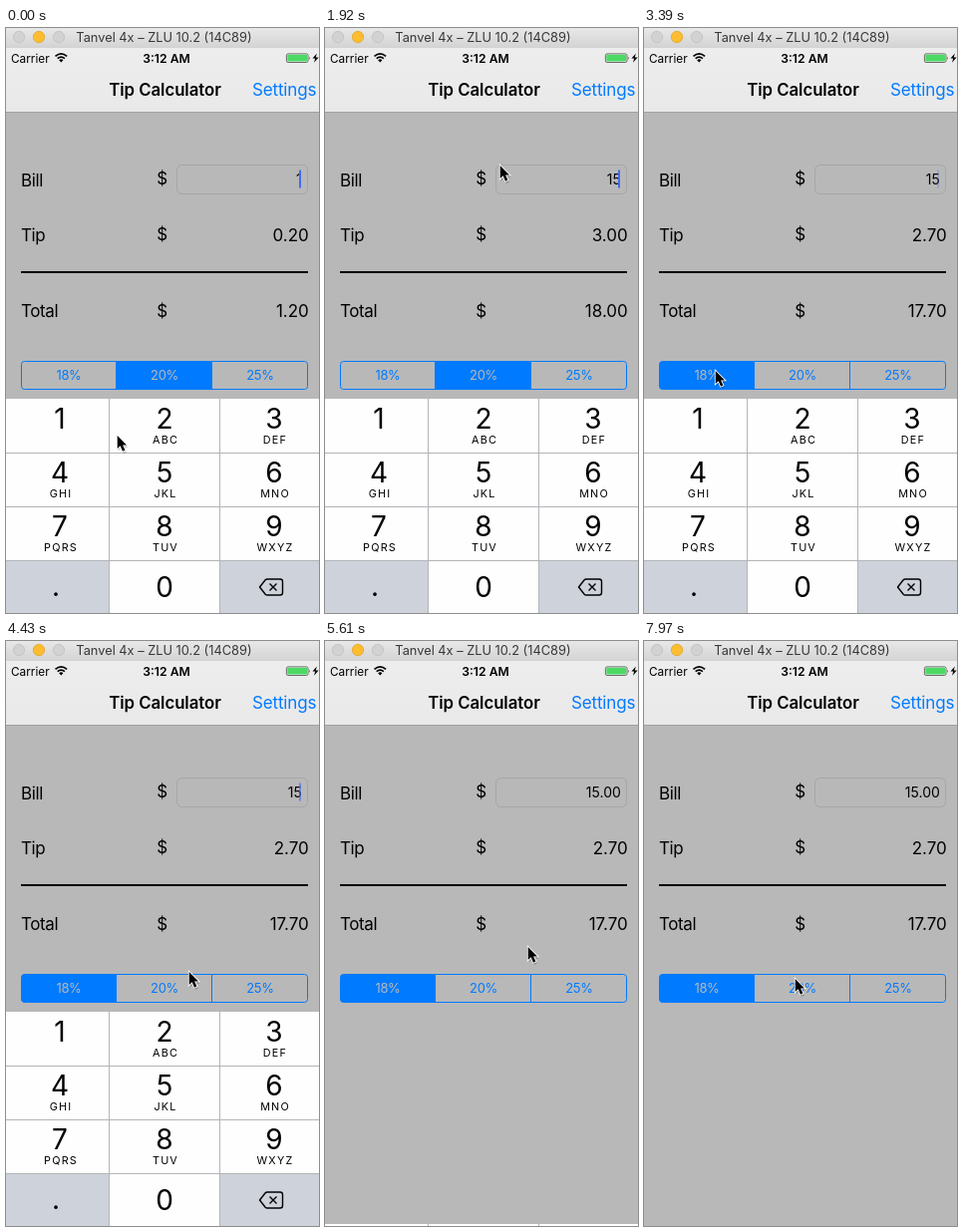
Recreate the animation shown at these times as an HTML page. Size 314 by 587 pixels, loop 8000 ms.

```html
<!DOCTYPE html>
<html lang="en">
<head>
<meta charset="utf-8">
<title>Tip Calculator</title>
<style>
html, body { margin: 0; width: 100%; height: 100%; overflow: hidden; background: #b8b8b8; }
svg { display: block; width: 314px; height: 587px; font: 17px Inter, "Open Sans", sans-serif; }
.label { letter-spacing: -.4px; }
.value { text-anchor: end; }
.small { font-size: 14px; }
.mid { text-anchor: middle; }
.seg { font-size: 13px; letter-spacing: -.3px; text-anchor: middle; }
.digit { font-size: 28px; text-anchor: middle; }
.letters { font-size: 10.8px; letter-spacing: 1.2px; text-anchor: middle; }
.blue { fill: #007aff; }

/* One shared 8 s clock; everything changes in hard steps. */
.anim { animation: 8s step-end infinite; }
.one { animation-name: one; }
.fifteen { animation-name: fifteen; }
.final { animation-name: final; }
.at20 { animation-name: at20; }
.sum20 { animation-name: sum20; }
.at18 { animation-name: at18; }
#press { animation-name: press; }
#caret { animation-name: caret; }
#pad { animation-name: pad; }
#pointer { animation-name: pointer; }

@keyframes one { 0% { opacity: 1 } 7.35%, 100% { opacity: 0 } }
@keyframes fifteen { 0% { opacity: 0 } 7.35% { opacity: 1 } 70.1%, 100% { opacity: 0 } }
@keyframes final { 0% { opacity: 0 } 70.1%, 100% { opacity: 1 } }
@keyframes at20 { 0% { opacity: 1 } 33.2%, 100% { opacity: 0 } }
@keyframes sum20 { 0% { opacity: 0 } 7.35% { opacity: 1 } 33.2%, 100% { opacity: 0 } }
@keyframes at18 { 0% { opacity: 0 } 33.2%, 100% { opacity: 1 } }
@keyframes press { 0% { opacity: 0 } 5.6% { opacity: 1 } 7.35%, 100% { opacity: 0 } }
@keyframes caret {
  0% { opacity: 1 }
  11.1% { opacity: 0 } 16.7% { opacity: .3 } 18.6% { opacity: 1 }
  25.85% { opacity: 0 } 29.45% { opacity: .3 } 31.35% { opacity: 1 }
  34.95% { opacity: .4 } 36.85% { opacity: 0 } 42.35% { opacity: .25 } 44.2% { opacity: 1 }
  47.85% { opacity: .4 } 49.7% { opacity: 0 } 55.35% { opacity: .6 } 57.1% { opacity: 1 }
  59% { opacity: .6 } 60.85% { opacity: 0 } 66.45% { opacity: .4 } 68.2% { opacity: 1 }
  70.1%, 100% { opacity: 0 }
}
@keyframes pad {
  0% { transform: none }
  70.1% { transform: translateY(213px) }
  71.95%, 100% { transform: translateY(220px) }
}
@keyframes pointer {
  0% { transform: translate(111px, 408px) }
  1.85% { transform: translate(119px, 428px) }
  3.7% { transform: translate(136px, 462px) }
  5.6% { transform: translate(139px, 469px) }
  16.7% { transform: translate(141px, 432px) }
  18.6% { transform: translate(164px, 222px) }
  20.35% { transform: translate(176px, 127px) }
  23.95% { transform: translate(175px, 137px) }
  25.85% { transform: translate(158px, 192px) }
  27.7% { transform: translate(112px, 283px) }
  29.45% { transform: translate(79px, 334px) }
  31.35% { transform: translate(71px, 343px) }
  44.2% { transform: translate(84px, 354px) }
  46.1% { transform: translate(125px, 395px) }
  47.85% { transform: translate(165px, 419px) }
  49.7% { transform: translate(185px, 410px) }
  51.6% { transform: translate(188px, 380px) }
  53.45% { transform: translate(186px, 350px) }
  55.35% { transform: translate(183px, 331px) }
  57.1% { transform: translate(188px, 320px) }
  59% { transform: translate(197px, 311px) }
  60.85% { transform: translate(203px, 306px) }
  73.7% { transform: translate(198px, 312px) }
  75.6% { transform: translate(180px, 328px) }
  77.45% { transform: translate(160px, 338px) }
  79.35% { transform: translate(149px, 341px) }
  81.1% { transform: translate(149px, 345px) }
  82.95% { transform: translate(148px, 350px) }
  86.7% { transform: translate(62px, 363px) }
  88.6% { transform: translate(43px, 362px) }
  92.2% { transform: translate(60px, 358px) }
  94.1% { transform: translate(110px, 345px) }
  95.95% { transform: translate(157px, 332px) }
  97.7% { transform: translate(156px, 334px) }
  99.6%, 100% { transform: translate(151px, 338px) }
}
</style>
</head>
<body>
<svg viewBox="0 0 314 587">
  <defs>
    <linearGradient id="chrome" x2="0" y2="1">
      <stop stop-color="#e8e8e8"/><stop offset="1" stop-color="#d3d3d3"/>
    </linearGradient>
    <linearGradient id="nav" x2="0" y2="1">
      <stop stop-color="#ededed"/><stop offset="1" stop-color="#e9e9e9"/>
    </linearGradient>
  </defs>
  <rect width="314" height="587" fill="#b8b8b8"/>

  <!-- Window title -->
  <rect width="314" height="20" fill="url(#chrome)"/>
  <g fill="#d2d2d2" stroke="#bebebe" stroke-width=".7">
    <circle cx="13" cy="9" r="5.7"/>
    <circle cx="33" cy="9" r="5.7" fill="#fdbd2f" stroke="#dfa023"/>
    <circle cx="53" cy="9" r="5.7"/>
  </g>
  <text class="mid" x="158.5" y="14" font-size="12.8" fill="#383838">Tanvel 4x – ZLU 10.2 (14C89)</text>

  <!-- Status and navigation bar -->
  <rect y="20" width="314" height="64" fill="url(#nav)"/>
  <rect y="84" width="314" height="1" fill="#a1a1a1"/>
  <text x="5" y="34.5" font-size="11.8">Carrier</text>
  <g fill="none" stroke="#000" stroke-width="1.7">
    <path d="M49.5 28.4q5.8-4.9 11.6 0M51.7 30.7q3.6-3 7.2 0"/>
    <path d="M53.2 32.2q2.1-1.7 4.2 0l-2.1 2.2z" fill="#000" stroke="none"/>
  </g>
  <text class="mid" x="161" y="34.5" font-size="12.2" font-weight="600">3:12 AM</text>
  <rect x="281.4" y="25.9" width="21.6" height="8.6" rx="1.6" fill="#f4f4f4" stroke="#4b4b4b" stroke-width=".8"/>
  <rect x="282.3" y="26.8" width="19.8" height="6.8" rx=".8" fill="#4cd964"/>
  <path d="M304 28.5q1.5 1.7 0 3.4z" fill="#444"/>
  <path d="M311.8 25.5l-4.3 5.1h2.7l-1.2 4.2 4.6-5.4h-2.8z"/>
  <text class="mid" x="159.5" y="68" font-weight="600" font-size="16.8" letter-spacing="-.05">Tip Calculator</text>
  <text class="blue" x="247" y="68" letter-spacing="-.15">Settings</text>

  <!-- Bill, tip and total -->
  <g class="label">
    <text x="15" y="158.5">Bill</text>
    <text x="15" y="213.5">Tip</text>
    <text x="15" y="289.5">Total</text>
    <g class="mid">
      <text x="156.5" y="156.5">$</text>
      <text x="156.5" y="212.5">$</text>
      <text x="156.5" y="289.5">$</text>
    </g>
  </g>
  <rect x="171.5" y="137.5" width="131" height="29" rx="5" fill="none" stroke="#a6a6a6"/>
  <rect x="15" y="244" width="288" height="2"/>
  <g class="value">
    <g class="anim one">
      <text class="small" x="296.8" y="157">1</text>
      <text x="303.8" y="213.5">0.20</text>
      <text x="303.8" y="289.5">1.20</text>
    </g>
    <text class="small anim fifteen" x="296.8" y="157">15</text>
    <text class="small anim final" x="296.8" y="157">15.00</text>
    <g class="anim sum20">
      <text x="303.8" y="213.5">3.00</text>
      <text x="303.8" y="289.5">18.00</text>
    </g>
    <g class="anim at18">
      <text x="303.8" y="213.5">2.70</text>
      <text x="303.8" y="289.5">17.70</text>
    </g>
  </g>
  <rect id="caret" class="anim" x="294" y="142.5" width="2" height="18" fill="#426bf2"/>

  <!-- Rate selector -->
  <g class="seg blue">
    <text x="63" y="353">18%</text>
    <text x="159" y="353">20%</text>
    <text x="255" y="353">25%</text>
  </g>
  <g class="seg anim at18">
    <path class="blue" d="M110.5 334.5h-92a3 3 0 0 0-3 3v22a3 3 0 0 0 3 3h92z"/>
    <text x="63" y="353" fill="#b8b8b8">18%</text>
  </g>
  <g class="seg anim at20">
    <rect class="blue" x="110.5" y="334.5" width="96" height="28"/>
    <text x="159" y="353" fill="#b8b8b8">20%</text>
  </g>
  <g fill="none" stroke="#007aff">
    <rect x="15.5" y="334.5" width="287" height="28" rx="3"/>
    <path d="M110.5 334.5v28M206.5 334.5v28"/>
  </g>

  <!-- Number pad -->
  <g id="pad" class="anim">
    <rect y="372" width="314" height="215" fill="#fefefe"/>
    <path d="M0 535h103v52H0zM215 535h99v52h-99z" fill="#ced2da"/>
    <rect id="press" class="anim" x="104" y="427" width="110" height="53" fill="#ced2da"/>
    <path d="M103.5 372v215M214.5 372v215M0 426.5h314M0 480.5h314M0 534.5h314" stroke="#b3b4b8" fill="none"/>
    <g class="digit">
      <text x="54" y="402">1</text><text x="159" y="402">2</text><text x="269" y="402">3</text>
      <text x="54" y="456">4</text><text x="159" y="456">5</text><text x="269" y="456">6</text>
      <text x="54" y="510">7</text><text x="159" y="510">8</text><text x="269" y="510">9</text>
      <text x="50" y="570">.</text><text x="159" y="571">0</text>
    </g>
    <g class="letters">
      <text x="160" y="417">ABC</text><text x="270" y="417">DEF</text>
      <text x="55" y="471">GHI</text><text x="160" y="471">JKL</text><text x="270" y="471">MNO</text>
      <text x="55" y="525">PQRS</text><text x="160" y="525">TUV</text><text x="270" y="525">WXYZ</text>
    </g>
    <g fill="none" stroke="#000" stroke-width="1.4" stroke-linejoin="round">
      <path d="M262 553h13q2.5 0 2.5 2.5v11q0 2.5-2.5 2.5h-13q-1 0-1.8-.8L254.5 561l5.7-7.2q.8-.8 1.8-.8z"/>
      <path d="M264.5 557.5l7 7M271.5 557.5l-7 7"/>
    </g>
  </g>

  <g id="pointer" class="anim">
    <path d="M1.5 3v13.500l3-2.700 2.400 5.200 3-1.200-2.300-5h4z" opacity=".2"/>
    <path d="M.7 1v13l3-2.700 2.300 5.400 2.400-1.100-2.300-5.200h3.900z" stroke="#fff" stroke-width="1.7" paint-order="stroke"/>
  </g>
</svg>
</body>
</html>
```
